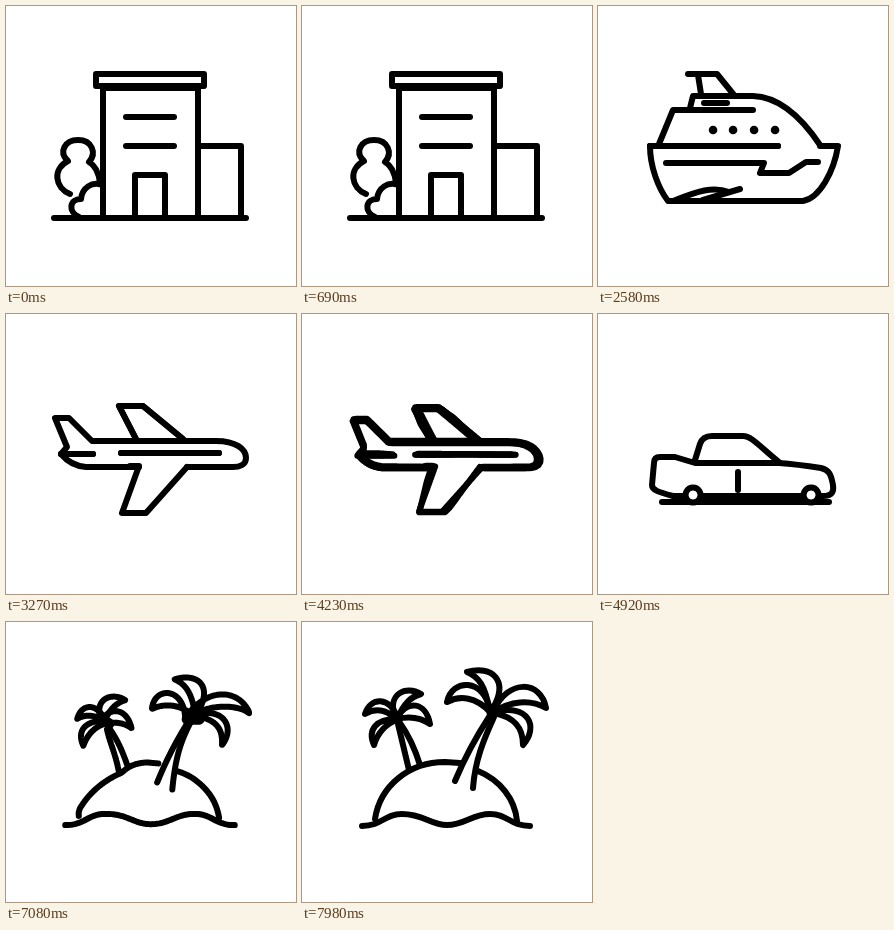
Animation of 290 by 280 pixels, one loop 8 s. Source, as an HTML page:

```html
<!DOCTYPE html>
<html lang="en">
<head>
<meta charset="utf-8">
<title>Travel icons</title>
<style>
html, body { margin: 0; width: 100%; height: 100%; overflow: hidden; background: #fff; }
svg { display: block; width: 100vw; height: 100vh; }
path { stroke: #000; stroke-linecap: round; stroke-linejoin: round; }
</style>
</head>
<body>
<svg id="stage" viewBox="0 0 290 280"></svg>
<script>
const NS = 'http://www.w3.org/2000/svg';
const LOOP = 8000, SAMPLES = 110;
const stage = document.getElementById('stage');

const line = (d, width = 6, fill = 'none') => ({ d, width, fill });
const dot = (x, y) => line(`M${x} ${y}h.1`, 8.5);
const wheel = d => line(d, 6, '#fff');
const ring = (x, y, r) => wheel(`M${x} ${y + r}a${r} ${r} 0 1 1 .1 0Z`);
const arch = x => wheel(`M${x - 13.5} 188A15 15 0 1 1 ${x + 13.5} 188`);

const building = [
  line('M48 212H240'),
  line('M97 212V82H192V212'),
  line('M90 68H198V80H90Z'),
  line('M120 111H168'),
  line('M120 140H168'),
  line('M129 211V169H159V211'),
  line('M194 140H235V211'),
  line('M64 188C49 182 46 163 62 155C52 146 59 134 72 134C86 134 91 147 83 156C90 160 93 168 94 177'),
  line('M73 211C62 206 63 193 75 193C76 182 86 175 96 179')
];

const ship = [
  line('M55 140H237L207 207H69Z'),
  line('M69 139L79 104H173L201 139'),
  line('M83 104L88 80H150L165 104'),
  line('M113 93H141'),
  line('M74 156H230'),
  line('M93 79V63H130L140 79'),
  line('M108 206C140 198 155 189 170 189C189 189 201 198 206 206'),
  line('M69 140L85 207'),
  line('M102 198C114 191 130 190 143 194'),
  line('M81 138L90 104'),
  line('M95 104L100 80'),
  line('M106 64V79'),
  dot(118, 122), dot(143, 122), dot(168, 122)
];
const shipDark = [...ship, line('M64 167H75L85 206H70Z', 2, '#000')];

const yacht = [
  line('M52 140C52 160 60 182 70 195H205C222 192 236 165 240 140H222'),
  line('M61 138L75 104H155'),
  line('M92 102L95 90H155C185 91 208 118 222 139'),
  line('M106 97H129'),
  line('M68 157H166L162 167H191L208 156H220'),
  line('M90 68H119L136 89'),
  line('M105 194L142 183'),
  line('M52 140H180'),
  line('M75 195C100 185 115 180 131 186'),
  line('M100 69L103 88'),
  dot(177, 124),
  line('M52 140H180'),
  dot(115, 124), dot(135, 124), dot(156, 124)
];

const plane = [
  line('M133 153H80C68 152 60 146 55 140L61 133L49 104H63L86 127H210C230 127 240 135 240 144C240 151 233 153 227 153H181'),
  line('M124 152H133L116 199H140L181 153'),
  line('M130 125L113 92H137L177 125'),
  line('M115 139H213'),
  line('M115 139H213'),
  line('M130 125L113 92H137L177 125'),
  line('M55 140H87'),
  line('M55 140H87')
];

const coupe = [
  line('M64 188H231'),
  line('M97 149L77 143H62C57 143 56 146 56 149L54 171C54 176 60 178 75 182H225C234 182 236 178 235 171C233 160 231 156 223 154C210 152 195 150 181 149Z'),
  line('M97 146L102 130C104 124 108 122 114 122H145C154 122 163 134 181 148'),
  line('M140 158V176'),
  ring(95, 181, 7.5),
  ring(213, 181, 7.5)
];

const hatchback = [
  line('M48 190H230L234 191L240 190'),
  line('M70 148C60 148 58 152 57 160L54 174C54 179 60 179 69 183H223C233 183 233 179 232 173C229 158 227 154 219 152C208 150 196 150 186 148Z'),
  line('M82 146L95 130C99 126 103 124.500 108 124.500H150C160 125 168 132 185 147'),
  line('M124.500 150V182'),
  arch(84),
  arch(188),
  line('M138 125C148 128 160 140 170 147'),
  line('M202 151C213 153 220 160 223 169C224 176 224 180 221 182')
];

const island = [
  line('M60 204C80 204 82 192 100 192C122 192 128 203 145 203C163 203 170 192 188 192C206 192 208 204 228 204'),
  line('M73 197C78 164 107 140 143 140L158 141'),
  line('M176 149C198 158 213 177 215 199'),
  line('M187 95C174 115 163 135 153 159'),
  line('M192 95C182 117 173 138 171 166'),
  line('M96 102L107 148'),
  line('M98 101C108 115 113 127 118 143'),
  line('M191 86C207 58 190 43 165 50C177 55 183 64 187 86'),
  line('M188 88C182 56 150 56 145 80C158 73 174 75 188 90'),
  line('M192 88C206 57 239 58 244 86C228 77 208 79 192 90'),
  line('M192 90C227 81 237 105 221 123C221 105 212 95 192 91'),
  line('M93 94C85 72 104 63 119 72C108 75 102 82 96 95'),
  line('M95 96C105 77 124 80 128 102C118 95 107 94 95 97'),
  line('M95 95C88 75 69 74 63 92C73 86 84 87 94 97'),
  line('M94 97C75 97 65 107 72 123C76 110 84 102 95 98'),
  line('M95 97h.1', 10),
  line('M190 91h.1', 11)
];

// Each pose: [shape list, time it is reached, time it is left]
const poses = [
  [building, 0, 760],
  [shipDark, 1170, 1180],
  [ship, 1380, 1880],
  [yacht, 2570, 2760],
  [plane, 3260, 4050],
  [coupe, 4910, 5280],
  [hatchback, 6260, 6370],
  [island, 7320, LOOP]
];

const make = () => document.createElementNS(NS, 'path');

function sample(shape) {
  const probe = make();
  probe.setAttribute('d', shape.d);
  const length = probe.getTotalLength();
  shape.points = Array.from({ length: SAMPLES + 1 }, (_, i) =>
    probe.getPointAtLength(length * i / SAMPLES));
}

poses.forEach(([shapes]) => shapes.forEach(sample));
const count = Math.max(...poses.map(([shapes]) => shapes.length));
const paths = Array.from({ length: count }, () => stage.appendChild(make()));

const mix = (a, b, k) => a + (b - a) * k;
const ease = k => k < .5 ? 4 * k ** 3 : 1 - (2 - 2 * k) ** 3 / 2;

function morph(a, b, k) {
  return 'M' + a.points.map((p, i) => {
    const q = b.points[i];
    return mix(p.x, q.x, k).toFixed(2) + ' ' + mix(p.y, q.y, k).toFixed(2);
  }).join('L');
}

function draw(t) {
  let at = poses.length - 1;
  while (poses[at][1] > t) at--;
  const [from, , leave] = poses[at];
  const [to, arrive] = poses[at + 1] || poses[at];
  const k = t <= leave ? 0 : ease((t - leave) / (arrive - leave));
  paths.forEach((path, i) => {
    // Surplus strokes lie on top of others until they are needed
    const spare = k === 0 && i >= from.length;
    path.style.display = spare ? 'none' : '';
    if (spare) return;
    const a = from[i % from.length], b = to[i % to.length];
    path.setAttribute('d', k ? morph(a, b, k) : a.d);
    path.setAttribute('stroke-width', mix(a.width, b.width, k));
    path.setAttribute('fill', k < .5 ? a.fill : b.fill);
  });
}

const start = performance.now();
function tick() {
  draw((performance.now() - start) % LOOP);
  requestAnimationFrame(tick);
}
tick();
</script>
</body>
</html>
```
